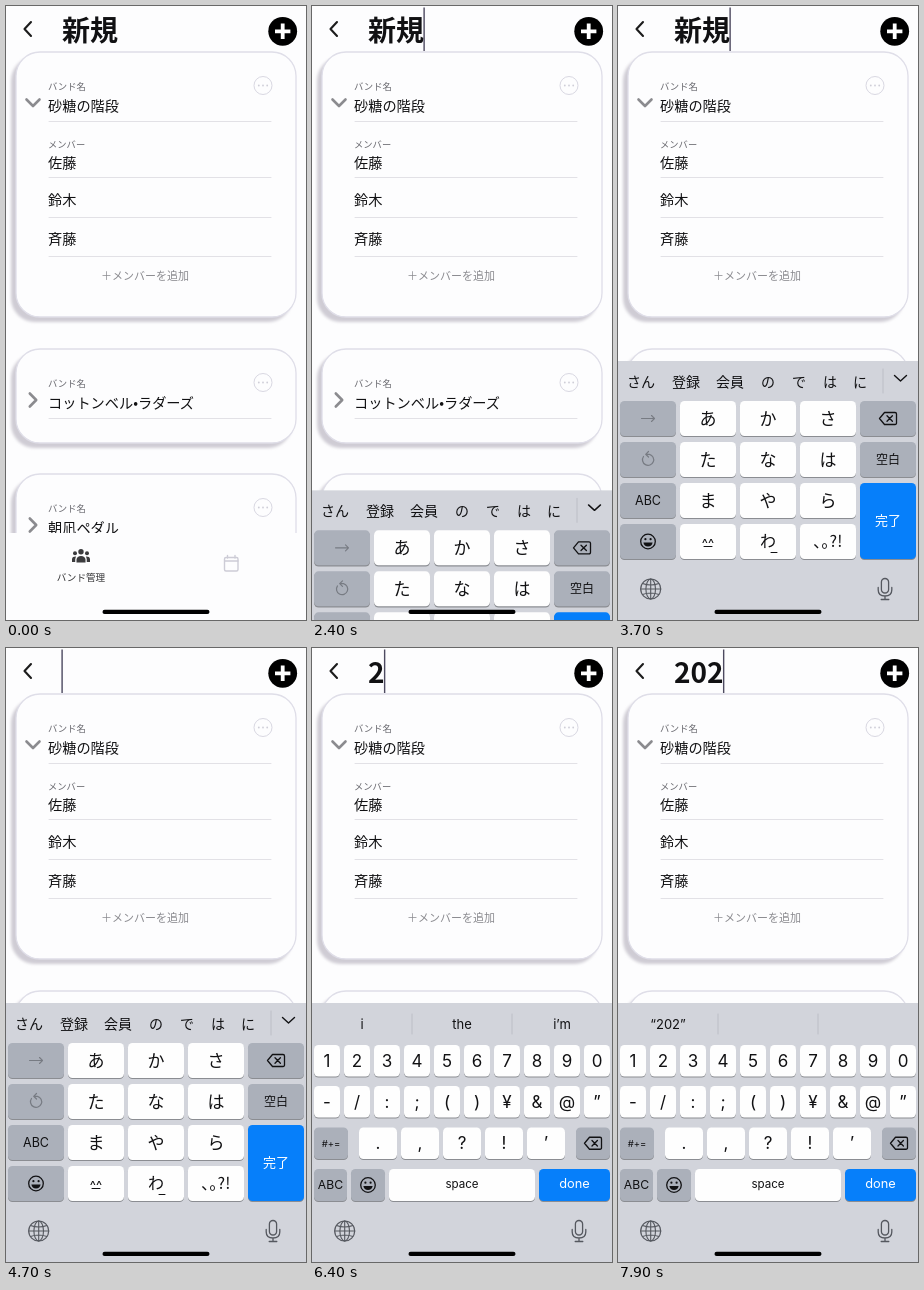
An HTML page for the animation above (8 s loop, 300 px wide and 614 px high).

```html
<!DOCTYPE html>
<html lang="ja">
<head>
<meta charset="utf-8">
<title>バンド管理</title>
<style>
html, body { margin: 0; width: 100%; height: 100%; overflow: hidden; background: #fdfdfe; }
svg { display: block; width: 100%; height: 100%; }
text { font-family: "Noto Sans CJK JP", "Noto Sans CJK", "Noto Sans", sans-serif; fill: #111113; white-space: pre; }
.en { font-family: Inter, Roboto, "Noto Sans CJK JP", sans-serif; }
.mid { text-anchor: middle; }
.line { fill: none; stroke-linecap: round; stroke-linejoin: round; }
</style>
</head>
<body>
<svg id="stage" viewBox="0 0 300 614" xmlns="http://www.w3.org/2000/svg"></svg>
<script>
const LOOP = 8000, STEP = 100;
const PAPER = "#fdfdfe", INK = "#111113", SOFT = "#6a6a70", PALE = "#d9d8e2";
const KEYBOARD = { top: 355, travel: 259, start: 2308, rate: 0.01826 };

// Focus and title edits, each also restarting the caret blink.
const EDITS = [
  [2000, "新規"], [2200, "新規"], [4000, "新"], [4300, ""],
  [6300, "2"], [7000, "20"], [7500, "202"]
];
const LAYOUTS = [[0, "kana"], [5300, "alpha"], [6000, "digits"]];
const SUGGEST_LAG = 300;

const stage = document.getElementById("stage");

const text = (x, y, size, str, opt = "") =>
  `<text x="${x}" y="${y}" font-size="${size}" ${opt}>${str}</text>`;
const line = (d, color, width) =>
  `<path class="line" d="${d}" stroke="${color}" stroke-width="${width}"/>`;
const rect = (x, y, w, h, r, fill, opt = "") =>
  `<rect x="${x}" y="${y}" width="${w}" height="${h}" rx="${r}" fill="${fill}" ${opt}/>`;
const dot = (x, y, r, fill) => `<circle cx="${x}" cy="${y}" r="${r}" fill="${fill}"/>`;
const ring = (x, y, r, color, width) =>
  `<circle cx="${x}" cy="${y}" r="${r}" fill="none" stroke="${color}" stroke-width="${width}"/>`;
const at = (x, y, body) => `<g transform="translate(${x} ${y})">${body}</g>`;

// ---- page ----
const rule = y => line(`M43 ${y}H265`, "#e2e1e6", 1);

function card(y, height, name, open) {
  const arrow = open ? "M20.5 93.5L27 100L33.5 93.5" : "M23.8 90.5L30.2 97L23.8 103.5";
  const more = [252.8, 257, 261.2].map(x => dot(x, 79.5, 0.9, "#cfced8")).join("");
  return rect(5, y + 5, 281, height, 24, "#cfccd4", 'filter="url(#soft)"') +
    rect(10, y, 280, height, 24, PAPER, 'stroke="#dfdee8" stroke-width="1.3"') +
    at(0, y - 46,
      line(arrow, "#8b8b8f", 2.6) +
      text(42, 84, 9.4, "バンド名", `style="fill:${SOFT}"`) +
      text(42, 105, 14.2, name) + rule(115.5) +
      ring(257, 79.5, 9, PALE, 1) + more);
}

function members() {
  const names = [["佐藤", 162], ["鈴木", 199], ["斉藤", 238]];
  return text(42, 142, 9.3, "メンバー", `style="fill:${SOFT}"`) +
    names.map(([name, y]) => text(42, y, 14.2, name)).join("") +
    [171.5, 211.5, 250.5].map(rule).join("") +
    text(95, 274, 11, "＋メンバーを追加", 'style="fill:#8a8a8f"');
}

function header() {
  return line("M25 16L18.5 23L25 30", "#1c1c1c", 2.1) +
    text(56, 35, 28, "新規", 'id="title" font-weight="700"') +
    rect(0, 1.5, 1.4, 43.5, 0, "#4d4a60", 'id="caret"') +
    dot(276.7, 25.3, 14.4, "#000") +
    `<path d="M276.7 17.5V33M269 25.3H284.4" stroke="#fff" stroke-width="3.8"/>`;
}

function tabBar() {
  const dark = "#3b3b3d", pale = "#cdccd6";
  const people = dot(75, 545.8, 2.7, dark) + dot(69, 547.2, 2, dark) + dot(81, 547.2, 2, dark) +
    `<path fill="${dark}" d="M70.5 556.5V553.5Q71 550 75 550T79.5 553.5V556.5ZM66 556V553Q66.5 550.5 70 550.6Q69.2 552 69.2 556ZM84 556V553Q83.5 550.5 80 550.6Q80.8 552 80.8 556Z"/>`;
  return rect(0, 527, 300, 87, 0, PAPER) + people +
    text(75, 575, 9.6, "バンド管理", 'class="mid" style="fill:#333335"') +
    rect(218.5, 551.5, 13.5, 13.5, 1.5, "none", `stroke="${pale}" stroke-width="1.4"`) +
    line("M219 555H232M221.5 549.5V552M229 549.5V552", pale, 1.4);
}

// ---- keyboards ----
const GREY = "#abb0ba", BLUE = "#067ffa", FAINT = "#777b83", ICON = "#55585f", DIVIDER = "#bcbec6";
const ROWS = [397, 438, 479.5, 521];

function key(x, y, w, h, face, fill = "#fefefe") {
  return rect(x, y + 1.1, w, h, 4.5, "#8b8d92") + rect(x, y, w, h, 4.5, fill) + face(x + w / 2, y + h / 2);
}
const label = (str, size, opt = 'class="mid"', drop = 0.37) =>
  (x, y) => text(x, y + size * drop, size, str, opt);
const latin = (str, size, drop = 0.36) => label(str, size, 'class="en mid"', drop);

const erase = (x, y) => at(x, y,
  line("M-8.5 0L-3.5 -6H7Q8.5 -6 8.5 -4.5V4.5Q8.5 6 7 6H-3.5ZM-1 -2.7L4.4 2.7M4.4 -2.7L-1 2.7", INK, 1.3));
const smile = (x, y) => at(x, y, ring(0, 0, 7.3, INK, 1.3) +
  dot(-2.6, -2.3, 1.1, INK) + dot(2.6, -2.3, 1.1, INK) +
  `<path d="M-4.6 1H4.6Q4 5 0 5T-4.6 1Z" fill="${INK}"/>`);
const shift = (x, y) => at(x, y, line("M0 -7L7.5 0.5H3.6V6.5H-3.6V0.5H-7.5Z", INK, 1.3));
const next = (x, y) => at(x, y, line("M-6.5 0H6.5M3.5 -3L6.5 0L3.5 3", FAINT, 1.1));
const undo = (x, y) => at(x, y,
  line("M-4.5 -3A5.6 5.6 0 1 0 1.5 -5.2H-2M0.5 -8L-2.3 -5.2L0.5 -2.5", FAINT, 1.2));
const face = (x, y) => text(x, y + 6, 13, "^^", 'class="en mid"') + line(`M${x - 4} ${y + 5}H${x + 4}`, INK, 1);
const wa = (x, y) => label("わ", 16)(x, y) + line(`M${x + 3} ${y + 11}H${x + 9}`, INK, 1);

function kana() {
  const grid = [
    [next, "あ", "か", "さ", erase],
    [undo, "た", "な", "は", label("空白", 12)],
    [latin("ABC", 12.5), "ま", "や", "ら"],
    [smile, face, wa, label("､｡?!", 16)]
  ];
  const words = [["さん", 9], ["登録", 54], ["会員", 98], ["の", 143], ["で", 174], ["は", 205], ["に", 235]];
  const keys = grid.map((row, r) => row.map((k, c) =>
    key(2 + c * 60, 395 + r * 41, 56, 35, typeof k === "string" ? label(k, 17) : k,
      c % 4 ? "#fefefe" : GREY)).join("")).join("");
  return words.map(([w, x]) => text(x, 380.7, 14, w)).join("") +
    line("M265 363V387", DIVIDER, 1) + line("M276.5 369.5L282.5 375L288.5 369.5", INK, 1.4) +
    keys + key(242, 477, 56, 76, label("完了", 13, 'class="mid" style="fill:#fff"', 0.3), BLUE);
}

const keyRow = (chars, x, row, size, drop, w = 26, pitch = 30) =>
  [...chars].map((c, i) => key(x + i * pitch, ROWS[row], w, 31.5, latin(c, size, drop))).join("");

function bottomRow(mode, space) {
  const y = ROWS[3];
  return key(2, y, 33, 32, latin(mode, 12.2), GREY) + key(39, y, 34, 32, smile, GREY) +
    key(77, y, 146, 32, latin(space, 11.6, 0.3)) +
    key(227, y, 71, 32, label("done", 12.8, 'class="en mid" style="fill:#fff"', 0.27), BLUE);
}

function alpha() {
  return keyRow("qwertyuiop", 2, 0, 19.5, 0.27) + keyRow("asdfghjkl", 17, 1, 19.5, 0.27) +
    key(2, ROWS[2], 34, 31.5, shift, GREY) + keyRow("zxcvbnm", 47, 2, 19.5, 0.27) +
    key(264, ROWS[2], 34, 31.5, erase, GREY) + bottomRow("123", "English (Japan)");
}

function digits() {
  return keyRow("1234567890", 2, 0, 17, 0.36) + keyRow("-/:;()¥&@”", 2, 1, 17, 0.34) +
    key(2, ROWS[2], 34, 31.5, latin("#+=", 9.5), GREY) + keyRow(".,?!’", 47, 2, 17, 0.36, 38, 42) +
    key(264, ROWS[2], 34, 31.5, erase, GREY) + bottomRow("ABC", "space");
}

const globe = at(32.7, 583, ring(0, 0, 10, ICON, 1.2) +
  `<ellipse rx="4.8" ry="10" fill="none" stroke="${ICON}" stroke-width="1.1"/>` +
  line("M0 -10V10M-10 0H10M-8.2 -5.5Q0 -2.5 8.2 -5.5M-8.2 5.5Q0 2.5 8.2 5.5", ICON, 1.1));

const mic = at(267, 583,
  rect(-3.6, -10.5, 7.2, 14.5, 3.6, "none", `stroke="${ICON}" stroke-width="1.3"`) +
  line("M-6.8 -1.5V1Q-6.8 7 0 7T6.8 1V-1.5M0 7V10.5M-3.8 10.5H3.8", ICON, 1.3));

const suggestions = `<g id="suggest">` +
  [50, 150, 250].map(x => text(x, 380.5, 13, "", 'class="en mid"')).join("") +
  line("M100 366V386M200 366V386", DIVIDER, 1) + "</g>";

stage.innerHTML =
  `<defs><filter id="soft" x="-10%" y="-10%" width="120%" height="125%"><feGaussianBlur stdDeviation="1.6"/></filter></defs>` +
  rect(0, 0, 300, 614, 0, PAPER) +
  card(46, 265, "砂糖の階段", true) + members() +
  card(343, 94, "コットンベル•ラダーズ", false) +
  card(468, 94, "朝凪ペダル", false) +
  header() + tabBar() +
  `<g id="keyboard">${rect(0, KEYBOARD.top, 300, 300, 0, "#d2d4db")}` +
  `<g id="kana">${kana()}</g><g id="alpha">${alpha()}</g><g id="digits">${digits()}</g>` +
  suggestions + globe + mic + "</g>" +
  rect(96.5, 603.8, 107, 4.2, 2.1, "#000");

const $ = id => document.getElementById(id);
const title = $("title"), caret = $("caret"), keyboard = $("keyboard"), suggest = $("suggest");
const words = suggest.querySelectorAll("text");

// ---- motion ----
const latest = (list, t) => list.filter(item => item[0] <= t).pop();
const show = (el, on) => { el.style.display = on ? "" : "none"; };

// Critically damped spring from 0 to 1.
function spring(ms) {
  const p = Math.max(0, ms) * KEYBOARD.rate;
  return 1 - (1 + p) * Math.exp(-p);
}

// Half a second on, half a second off, with quarter-second fades.
function blink(ms) {
  if (ms < 500) return 1;
  const p = ms % 1000;
  return p < 500 ? Math.min(1, p / 250) : Math.max(0, 1 - (p - 500) / 250);
}

function render(t) {
  const edit = latest(EDITS, t);
  title.textContent = edit ? edit[1] : "新規";
  show(caret, edit);
  if (edit) {
    const width = edit[1] ? title.getComputedTextLength() : 0;
    caret.setAttribute("x", 55.4 + width);
    caret.setAttribute("opacity", blink(t - edit[0]));
  }

  const drop = KEYBOARD.travel * (1 - spring(t - KEYBOARD.start));
  keyboard.setAttribute("transform", `translate(0 ${drop.toFixed(2)})`);
  show(keyboard, t > KEYBOARD.start);

  const layout = latest(LAYOUTS, t)[1];
  for (const [, id] of LAYOUTS) show($(id), id === layout);
  show(suggest, layout !== "kana");

  const known = latest(EDITS, t - SUGGEST_LAG);
  const typed = known && /\d/.test(known[1]);
  const list = typed ? [`“${known[1]}”`, "", ""] : ["i", "the", "i’m"];
  words.forEach((el, i) => { el.textContent = list[i]; });
}

const begin = performance.now();
function tick() {
  const t = (performance.now() - begin) % LOOP;
  render(Math.floor(t / STEP) * STEP);
  requestAnimationFrame(tick);
}
tick();
</script>
</body>
</html>
```
